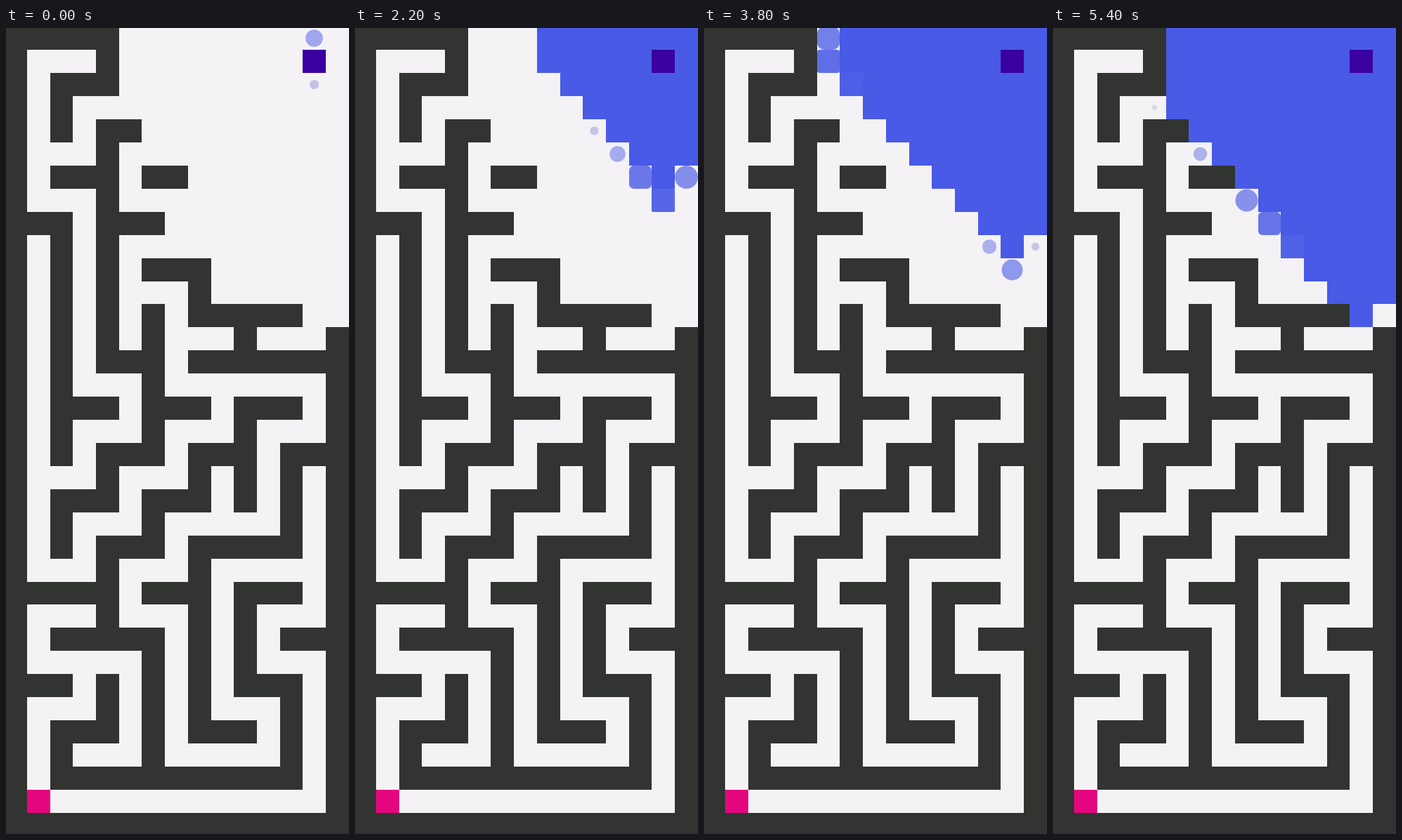
Animation, 488 px wide and 1148 px high, one loop 5500 ms. Source, as an HTML page with a canvas:

```html
<!DOCTYPE html>
<html lang="en">
<head>
<meta charset="utf-8">
<title>Maze flood</title>
<style>
html, body { margin: 0; width: 100%; height: 100%; overflow: hidden; background: #f4f2f5; }
canvas { display: block; }
</style>
</head>
<body>
<canvas id="stage" width="488" height="1148"></canvas>
<script>
const ctx = document.getElementById('stage').getContext('2d');
const LOOP = 5500, TICK = 100;
const WALL = '#323431', FLOOR = '#f4f2f5', START = '#3a00a0', GOAL = '#e5067f';
const BLUE = [72, 90, 230], DUSK = [60, 55, 130];
const GROW = 180, SQUARE = 340, FADE = 360;
const start = [1, 13], goal = [33, 1];

const maze = `
#####..........
#...#..........
#.###..........
#.#............
#.#.##.........
#...#..........
#.###.##.......
#...#..........
###.###........
#.#.#..........
#.#.#.###......
#.#.#...#......
#.#.#.#.#####..
#.#.#.#...#...#
#.#.###.#######
#.#...#.......#
#.###.###.###.#
#.#...#...#...#
#.#.###.###.###
#...#...#.#.#.#
#.###.###.#.#.#
#.#...#.....#.#
#.#.###.#####.#
#...#...#.....#
#####.###.###.#
#...#...#.#...#
#.#####.#.#.###
#.....#.#.#...#
###.#.#.#.###.#
#...#.#.#...#.#
#.###.#.###.#.#
#.#...#.....#.#
#.###########.#
#.............#
###############`.trim().split('\n');

// Search pace: cell order number and the time it is reached
const pace = [[0, -134], [2, -10], [13, 752], [15, 862], [22, 1362], [24, 1457], [45, 2640],
  [47, 2768], [60, 3535], [65, 3789], [78, 4581], [80, 4678], [90, 5362]];

const edgeX = c => Math.round(29.9 + (c - 1) * 32.7);
const edgeY = r => Math.round(31.35 + (r - 1) * 32.92);

function box(r, c) {
  const x = edgeX(c), y = edgeY(r);
  return [x, y, edgeX(c + 1) - x, edgeY(r + 1) - y];
}

function fillCell(r, c, color) {
  ctx.fillStyle = color;
  ctx.fillRect(...box(r, c));
}

function reachTime(i) {
  let k = 1;
  while (pace[k][0] < i) k++;
  const [i0, t0] = pace[k - 1], [i1, t1] = pace[k];
  return t0 + (t1 - t0) * (i - i0) / (i1 - i0);
}

// Breadth-first: up, down, left, right
function search() {
  const seen = new Set([start.join()]), queue = [start];
  for (const [r, c] of queue) {
    for (const [dr, dc] of [[-1, 0], [1, 0], [0, -1], [0, 1]]) {
      const next = [r + dr, c + dc], key = next.join();
      if (maze[next[0]]?.[next[1]] !== '.' || seen.has(key)) continue;
      seen.add(key);
      queue.push(next);
    }
  }
  const last = pace[pace.length - 1][0];
  return queue.slice(1, last + 2).map(([r, c], i) => ({ r, c, at: reachTime(i) }));
}

const visits = search();

function drawVisit({ r, c, at }, time) {
  const age = time - at;
  if (age <= 0) return;
  const [x, y, w, h] = box(r, c);
  const scale = Math.min(1, age / GROW);
  const corner = Math.max(0, Math.min(1, (SQUARE - age) / (SQUARE - GROW))) ** 2;
  const alpha = 1 - Math.max(0, 1 - age / FADE) ** 1.5;
  const warm = Math.min(1, age / 120);
  const rgb = BLUE.map((v, i) => Math.round(DUSK[i] + (v - DUSK[i]) * warm));
  const sw = w * scale, sh = h * scale;
  ctx.fillStyle = `rgba(${rgb},${alpha})`;
  ctx.beginPath();
  ctx.roundRect(x + (w - sw) / 2, y + (h - sh) / 2, sw, sh, corner * Math.min(sw, sh) / 2);
  ctx.fill();
}

function draw(time) {
  ctx.fillStyle = FLOOR;
  ctx.fillRect(0, 0, 488, 1148);
  maze.forEach((row, r) => [...row].forEach((cell, c) => {
    if (cell === '#') fillCell(r, c, WALL);
  }));
  fillCell(...goal, GOAL);
  for (const visit of visits) drawVisit(visit, time);
  fillCell(...start, START);
}

const begin = performance.now();
function frame() {
  const time = (performance.now() - begin) % LOOP;
  draw(Math.floor(time / TICK) * TICK);
  requestAnimationFrame(frame);
}
frame();
</script>
</body>
</html>
```
